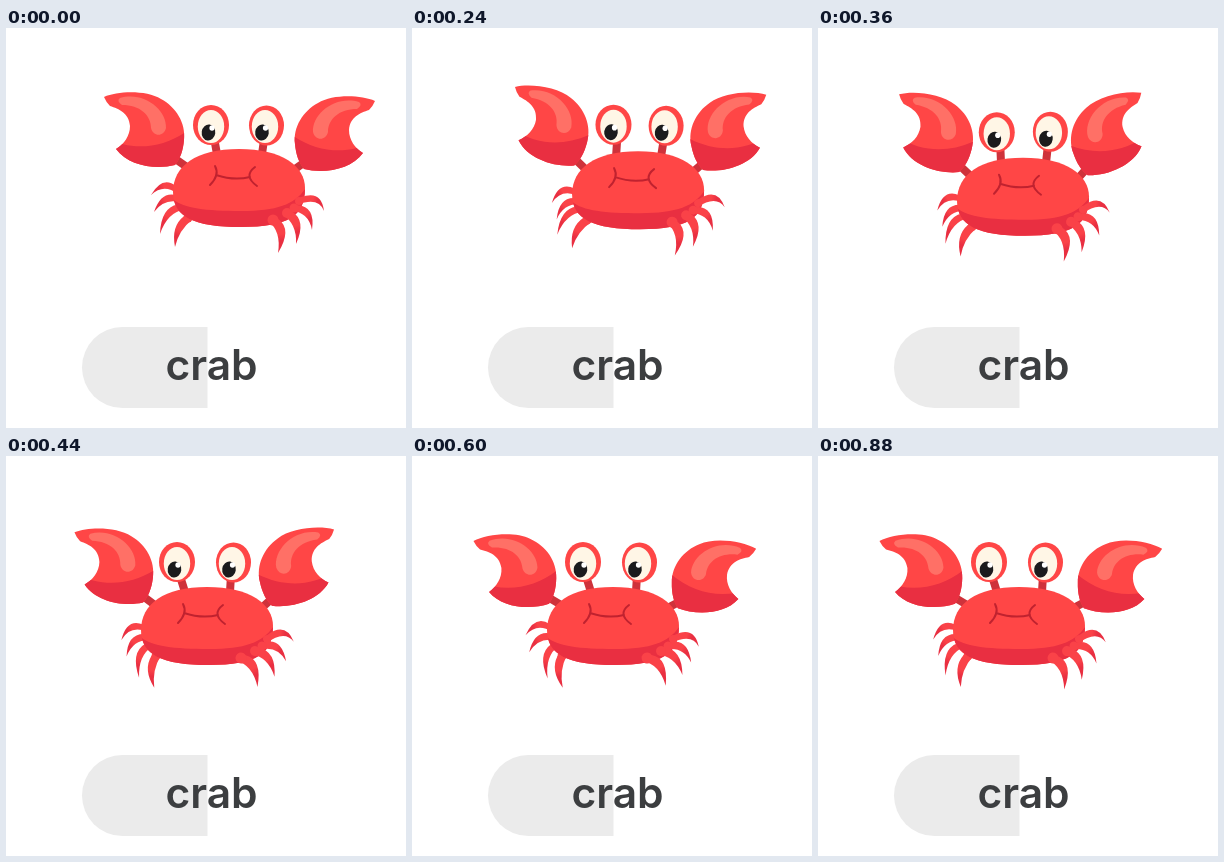
Recreate the animation shown at these times as an HTML page with a canvas. Size 400 by 400 pixels, loop 0.92 s.

```html
<!DOCTYPE html>
<html lang="en">
<head>
<meta charset="utf-8">
<title>crab</title>
<style>
  html, body { margin: 0; width: 100%; height: 100%; overflow: hidden; background: #fff; }
  canvas { display: block; width: 400px; height: 400px; }
</style>
</head>
<body>
<canvas id="stage" width="400" height="400"></canvas>
<script>
const ctx = document.getElementById('stage').getContext('2d');
const LOOP = 920, STEP = 40, HOLD = 160;
const RED = '#ff4646', DARK = '#e92f41', LIGHT = '#ff7066', LIMB = '#cf323b',
      LINE = '#c0222f', CREAM = '#fff6e6', INK = '#1b1b1d';
const rad = Math.PI / 180;

// Eased value through [time, value] pairs.
function track(t, ...keys) {
  if (t <= keys[0][0]) return keys[0][1];
  for (let i = 1; i < keys.length; i++) {
    const [t0, a] = keys[i - 1], [t1, b] = keys[i];
    if (t < t1) return a + (b - a) * (1 - Math.cos(Math.PI * (t - t0) / (t1 - t0))) / 2;
  }
  return keys[keys.length - 1][1];
}

function fill(path, color) {
  ctx.fillStyle = color;
  ctx.fill(path);
}

function line(path, color, width) {
  ctx.strokeStyle = color;
  ctx.lineWidth = width;
  ctx.lineCap = 'round';
  ctx.stroke(path);
}

function oval(x, y, rx, ry, color, tilt = 0) {
  ctx.beginPath();
  ctx.ellipse(x, y, rx, ry, tilt * rad, 0, Math.PI * 2);
  ctx.fillStyle = color;
  ctx.fill();
}

function turned(x, y, degrees, draw) {
  ctx.save();
  ctx.translate(x, y);
  ctx.rotate(degrees * rad);
  ctx.translate(-x, -y);
  draw();
  ctx.restore();
}

const body = new Path2D('M167 164C167 138 190 121 233 121C276 121 299 138 299 160C299 188 282 199 235 199C188 199 167 189 167 164Z');
const belly = new Path2D('M160 163C168 179 190 183 235 183C277 183 294 174 304 152V205H160Z');
const mouth = new Path2D('M209 138Q214 147 204 157M210 147Q228 153 244 149M249 139Q237 148 251 158');
const claw = new Path2D('M98 69C112 63 140 62 155 71C170 79 180 95 178 112C177 123 174 131 169 137C150 142 122 138 110 121C118 116 124 108 124 98C123 85 113 81 104 78Q100 74 98 69Z');
const clawShade = new Path2D('M100 110C128 124 158 120 184 101V145H100Z');
const clawShine = new Path2D('M114 70C138 63 161 82 160 100C158 109 147 109 145 100C145 87 134 77 116 77Q110 73 114 70Z');
const clawArm = new Path2D('M168 130L188 144');
const pill = new Path2D('M201.5 299H116.5A40.5 40.5 0 0 0 116.5 380H201.5Z');

function drawClaw(angle) {
  turned(180, 137, angle, () => {
    line(clawArm, LIMB, 8);
    fill(claw, RED);
    ctx.save();
    ctx.clip(claw);
    fill(clawShade, DARK);
    ctx.restore();
    fill(clawShine, LIGHT);
  });
}

// Curved, pointed leg: base, bend and tip, turning about its base.
function drawLeg([bx, by, cx, cy, tx, ty, w], angle) {
  const len = Math.hypot(tx - bx, ty - by);
  const nx = -(ty - by) / len * w, ny = (tx - bx) / len * w;
  turned(bx, by, -angle, () => {
    const shade = ctx.createLinearGradient(bx, by, tx, ty);
    shade.addColorStop(0.45, '#fa4248');
    shade.addColorStop(0.65, DARK);
    ctx.beginPath();
    ctx.moveTo(bx + nx, by + ny);
    ctx.quadraticCurveTo(cx + nx, cy + ny, tx, ty);
    ctx.quadraticCurveTo(cx - nx, cy - ny, bx - nx, by - ny);
    ctx.fillStyle = shade;
    ctx.fill();
    oval(bx, by, w, w, '#fa4248');
  });
}

function drawEye(x, y, rx, white, pupil, stalkX, dx, dy) {
  line(new Path2D(`M${x + dx + (stalkX - x) * 0.6} ${y + dy + 16}L${stalkX} 126`), LIMB, 8);
  ctx.save();
  ctx.translate(dx, dy);
  oval(x, y, rx, 20, RED);
  oval(white, 98.5, 13.2, 16.5, CREAM);
  oval(pupil, 104.5, 6.8, 8, INK, 8);
  oval(pupil + 3.5, 100, 2.6, 2.8, '#fff');
  ctx.restore();
}

const leftLegs = [
  [171, 162, 157, 151, 145, 167, 4],
  [173, 171, 157, 166, 148, 184, 4],
  [175, 179, 158, 182, 154, 206, 4],
  [182, 190, 169, 200, 169, 219, 4.5]
];
const rightLegs = [
  [293, 173, 314, 165, 318, 183, 4],
  [288, 180, 306, 181, 306, 202, 4.5],
  [281, 185, 296, 194, 290, 216, 5],
  [267, 192, 281, 202, 272, 225, 5.5]
];

function drawCrab(t) {
  const front = track(t, [130, 0], [240, -4], [320, -3], [440, 21], [570, 27], [720, 11], [880, 11]);
  const back = track(t, [130, 0], [240, 13], [320, 15], [440, 16], [600, 5], [720, 6], [880, 15]);
  const travel = track(t, [160, 0], [420, 1]);

  ctx.save();
  ctx.translate(-32 * travel, 10 * travel);

  drawClaw(track(t, [145, 0], [280, 11.5], [560, -4]));
  ctx.save();
  ctx.translate(467, 4);
  ctx.scale(-1, 1);
  drawClaw(track(t, [150, 0], [340, 13.5], [600, -6.5]));
  ctx.restore();

  leftLegs.forEach((leg, i) => drawLeg(leg, i < 2 ? back : front));

  drawEye(205, 97, 18, 205, 202.5, 211,
    track(t, [130, 0], [260, 3.6], [320, 3], [440, -2]),
    track(t, [130, 0], [240, -2.5], [440, -1]));
  drawEye(260.5, 97.5, 17.5, 259, 256, 256,
    track(t, [160, 0], [280, 0.7], [440, -1]),
    track(t, [130, 0], [320, -3], [440, -1]));

  fill(body, RED);
  ctx.save();
  ctx.clip(body);
  fill(belly, DARK);
  ctx.restore();
  line(mouth, LINE, 2);

  const swings = [back, (front + back) / 2, front, front];
  rightLegs.forEach((leg, i) => drawLeg(leg, swings[i]));
  ctx.restore();
}

function frame(now) {
  const step = Math.floor((now % LOOP) / STEP) * STEP;
  ctx.fillStyle = '#fff';
  ctx.fillRect(0, 0, 400, 400);
  fill(pill, '#ebebeb');
  ctx.fillStyle = '#3c3e40';
  ctx.font = '600 42.5px Inter, sans-serif';
  ctx.textAlign = 'center';
  ctx.fillText('crab', 205.5, 352);
  drawCrab(step < HOLD ? 0 : step);
  requestAnimationFrame(frame);
}
requestAnimationFrame(frame);
</script>
</body>
</html>
```
